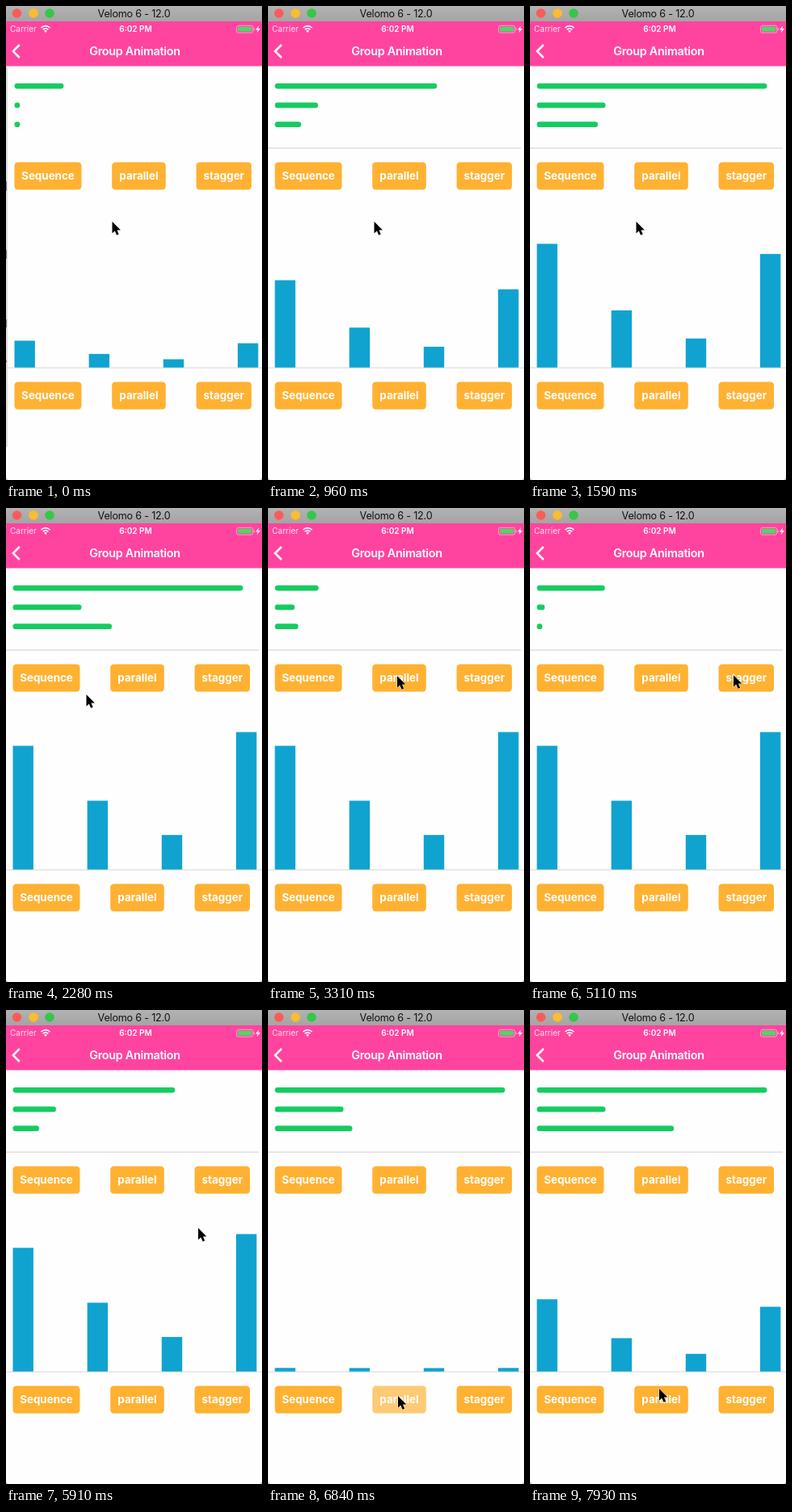
Write an HTML page that moves like this. It is 317 by 587 pixels and loops after 7.99 s.

```html
<!DOCTYPE html>
<html lang="en">
<head>
<meta charset="utf-8">
<title>Group Animation</title>
<style>
  html, body { margin: 0; width: 100%; height: 100%; overflow: hidden; background: #fff; }
  svg { display: block; width: 100%; height: 100%; }
  text { font-family: Inter, Roboto, sans-serif; }
  .label { font-size: 13.4px; font-weight: 700; fill: #fff; text-anchor: middle; }
</style>
</head>
<body>
<svg id="stage" viewBox="0 0 317 587">
  <defs>
    <linearGradient id="chrome" x2="0" y2="1">
      <stop stop-color="#b2b2b2"/><stop offset="1" stop-color="#a4a4a4"/>
    </linearGradient>
  </defs>
  <rect width="317" height="587" fill="#b8b8b8"/>
  <path d="M0 0H317V583q0 4-4 4H4q-4 0-4-4Z" fill="#fefefe"/>

  <g id="under">
    <rect y="75" width="2" height="471" fill="#dcdcdc"/>
    <path d="M.5 217v12M.5 302v11M.5 388v10M.5 439v2" stroke="#777"/>
  </g>
  <g id="page">
    <path id="rule" d="M0 176H313" stroke="#dedede" stroke-width="1.3"/>
    <path d="M0 448.2H317" stroke="#dedede" stroke-width="1.3"/>
  </g>

  <rect width="317" height="19.5" fill="url(#chrome)"/>
  <circle cx="13.5" cy="9" r="5.8" fill="#fc5b57"/>
  <circle cx="34" cy="9" r="5.8" fill="#fdbc2e"/>
  <circle cx="54" cy="9" r="5.8" fill="#34c748"/>
  <text x="158.5" y="13.8" font-size="12.6" letter-spacing="-.2" text-anchor="middle" fill="#111">Velomo 6 - 12.0</text>

  <rect y="19" width="317" height="55.5" fill="#ff449f"/>
  <g fill="#fff">
    <text x="5" y="32.3" font-size="10" fill-opacity=".85">Carrier</text>
    <text x="160.5" y="32.3" font-size="10" font-weight="600" text-anchor="middle">6:02 PM</text>
    <text x="159.5" y="61" font-size="14.4" font-weight="600" letter-spacing="-.3" text-anchor="middle">Group Animation</text>
    <path d="M49 33l-2-2.3q2-1.6 4 0Z"/>
    <path d="M309 29.5l4.2-5-.9 3.4h2.7l-4.2 5 .9-3.4Z"/>
    <path d="M306.6 27v3.4q1.2-.5 1.2-1.7t-1.2-1.7Z" opacity=".6"/>
  </g>
  <g fill="none" stroke="#fff">
    <path d="M45.6 29.2q3.4-2.8 6.8 0M43.4 27q5.6-4.6 11.2 0" stroke-width="1.6"/>
    <path d="M16.8 48l-8 8 8 8" stroke-width="2.5"/>
    <rect x="285.5" y="24.3" width="20.3" height="8.8" rx="2.2" stroke-width=".8" stroke-opacity=".6"/>
  </g>
  <rect x="287" y="25.8" width="17.3" height="5.8" rx="1" fill="#4cd964"/>

  <path id="cursor" d="M0 0V14.6L3.3 11.5 5.6 16.8 8.2 15.7 6 10.5H10.4Z" fill="#000" stroke="#fff" stroke-width="1" paint-order="stroke"/>
</svg>
<script>
const LOOP = 7990;
const SLOW = 0.955;
const MOUNT = -371;
const GREEN_PARALLEL = 2986, GREEN_STAGGER = 4579, BLUE_PARALLEL = 6838;
const STAGGER = 500;

const $ = id => document.getElementById(id);
const clamp = v => Math.max(0, Math.min(1, v));
const page = $('page');

function make(tag, attrs, parent = page) {
  const el = document.createElementNS('http://www.w3.org/2000/svg', tag);
  for (const k in attrs) el.setAttribute(k, attrs[k]);
  parent.append(el);
  return el;
}

const rows = [[285, 2000], [85, 1500], [169.7, 2500]].map(([size, ms], i) => ({
  size, ms,
  el: make('rect', { x: 8.5, y: 95.7 + i * 23.8, height: 6.8, rx: 3.4, fill: '#14cc60' })
}));

const columns = [[153.2, 2000], [85.2, 2500], [42.8, 2500], [170.2, 2500]].map(([size, ms], i) => ({
  size, ms,
  el: make('rect', { x: 8.5 + i * 92.15, width: 25.4, fill: '#10a3d0' })
}));

function button(label, x, width, y) {
  const g = make('g', {});
  make('rect', { x, y, width, height: 34, rx: 4.2, fill: '#ffb132' }, g);
  make('text', { x: x + width / 2, y: y + 21.9, class: 'label' }, g).textContent = label;
  return g;
}
const [top3, bottom3] = [193.4, 465.5].map(y => [
  button('Sequence', 8.5, 83, y),
  button('parallel', 129.2, 66.6, y),
  button('stagger', 233.6, 68.4, y)
]);

const presses = [
  [top3[1], GREEN_PARALLEL], [top3[2], GREEN_STAGGER], [bottom3[1], BLUE_PARALLEL]
];

// time, x, y of the pointer tip
const track = [
  [0, 131.5, 267], [1750, 131.5, 267], [2240, 99.5, 231], [2300, 99.5, 231],
  [2450, 116, 221], [2750, 160, 208], [3500, 160, 208], [4070, 226, 211],
  [4300, 252, 207], [5700, 252, 207], [5890, 238, 270], [5960, 238, 270],
  [6450, 161, 478], [7400, 161, 478], [7700, 160, 469], [LOOP, 160, 469]
];

function pointer(t) {
  const i = track.findIndex(k => k[0] > t);
  const [t0, x0, y0] = track[i - 1], [t1, x1, y1] = track[i];
  const p = (t - t0) / (t1 - t0), e = p * p * (3 - 2 * p);
  return [x0 + (x1 - x0) * e, y0 + (y1 - y0) * e];
}

function grow(bar, from, elapsed) {
  return from + (bar.size - from) * clamp(elapsed / (bar.ms * SLOW));
}

// Quick dip, slower recovery
function pressOpacity(dt) {
  return dt < 20 ? 1 - 0.4 * clamp((dt + 80) / 100) : 0.6 + 0.4 * clamp((dt - 20) / 250);
}

function draw(t) {
  const slide = t < 400 ? 2 * Math.exp(-t / 90) : 0;
  page.setAttribute('transform', `translate(${slide})`);
  $('under').setAttribute('transform', `translate(${slide - 2})`);
  $('rule').setAttribute('opacity', t < 60 ? 0 : 1);

  const start = t >= GREEN_STAGGER ? GREEN_STAGGER : t >= GREEN_PARALLEL ? GREEN_PARALLEL : MOUNT;
  const gap = start === GREEN_PARALLEL ? 0 : STAGGER * SLOW;
  rows.forEach((bar, i) => bar.el.setAttribute('width', grow(bar, 6.8, t - start - i * gap)));

  const rise = t - (t >= BLUE_PARALLEL ? BLUE_PARALLEL : MOUNT);
  columns.forEach(bar => {
    const h = grow(bar, 4.2, rise);
    bar.el.setAttribute('y', 447.7 - h);
    bar.el.setAttribute('height', h);
  });

  presses.forEach(([el, at]) => el.setAttribute('opacity', pressOpacity(t - at)));
  $('cursor').setAttribute('transform', `translate(${pointer(t)})`);
}

const begin = performance.now();
function tick() {
  draw((performance.now() - begin) % LOOP);
  requestAnimationFrame(tick);
}
tick();
</script>
</body>
</html>
```
